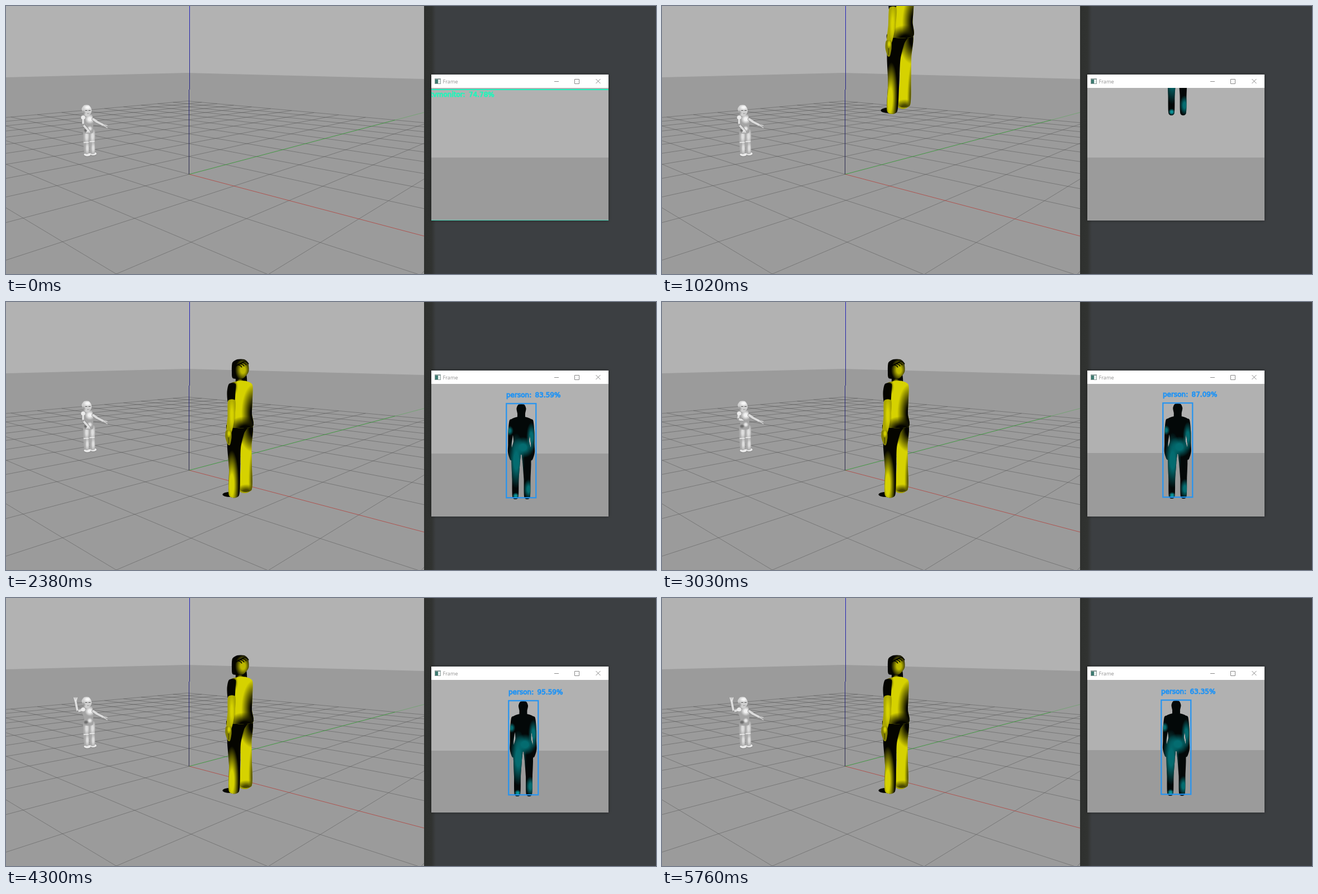
These frames come from a looping animation (1163 by 481 pixels, 6.53 s). An HTML page with a canvas:

```html
<!DOCTYPE html>
<html lang="en">
<head>
<meta charset="utf-8">
<title>Robot greeting</title>
<style>
  html, body { margin: 0; width: 100%; height: 100%; overflow: hidden; background: #3c3f42; }
  canvas { display: block; }
</style>
</head>
<body>
<canvas id="stage" width="1163" height="481"></canvas>
<script>
const c = document.getElementById('stage').getContext('2d');
const LOOP = 6530;
const YELLOW = '#d6d200', BLACK = '#050500', TEAL = '#046c70', INK = '#030808', BLUE = '#2494f2';

// ---------- helpers ----------
function rect(x, y, w, h, color) {
  c.fillStyle = color;
  c.fillRect(x, y, w, h);
}

function line(pts, color, width = 1) {
  c.beginPath();
  for (const [x, y] of pts) c.lineTo(x, y);
  c.strokeStyle = color;
  c.lineWidth = width;
  c.stroke();
}

function oval(x, y, rx, ry, color) {
  c.beginPath();
  c.ellipse(x, y, rx, ry, 0, 0, 7);
  c.fillStyle = color;
  c.fill();
}

// smooth ramp from 0 to 1 between two times
function ramp(t, from, to) {
  const u = Math.max(0, Math.min(1, (t - from) / (to - from)));
  return u * u * (3 - 2 * u);
}

// upright body part through knots of [x, y, half width]
function tube(...knots) {
  const pts = [...knots.map(([x, y, w]) => [x - w, y]),
               ...knots.reverse().map(([x, y, w]) => [x + w, y])];
  const n = pts.length, path = new Path2D();
  path.moveTo(...pts[0]);
  pts.forEach((p, i) => {
    const [o, q, r] = [n - 1, 1, 2].map(k => pts[(i + k) % n]);
    path.bezierCurveTo(p[0] + (q[0] - o[0]) / 8, p[1] + (q[1] - o[1]) / 8,
                       q[0] - (r[0] - p[0]) / 8, q[1] - (r[1] - p[1]) / 8, ...q);
  });
  return path;
}

// fill a path, with soft spots of [x, y, rx, ry, color] inside it
function paint(path, base, ...spots) {
  c.save();
  c.fillStyle = base;
  c.fill(path);
  c.clip(path);
  for (const [x, y, rx, ry, color] of spots) {
    c.save();
    c.translate(x, y);
    c.scale(rx, ry);
    const glow = c.createRadialGradient(0, 0, .3, 0, 0, 1);
    glow.addColorStop(0, color);
    glow.addColorStop(1, color + '00');
    rect(-1, -1, 2, 2, glow);
    c.restore();
  }
  c.restore();
}

// ---------- ground ----------
const depth = (x, y) => 1 - .0949 * x + .0936 * y;

function project(x, y) {
  const w = depth(x, y);
  return [(328 + 41.2 * x + 102 * y) / w, 100.7 + 201.3 / w];
}

function floorLine(place, from, to, color) {
  const pts = [];
  for (let s = from; s <= to; s += .5) {
    const spot = place(s);
    if (depth(...spot) > .35) pts.push(project(...spot));
  }
  line(pts, color);
}

function world() {
  rect(0, 0, 748, 481, '#b2b2b2');
  c.beginPath();
  for (const [x, y] of [[0, 128], [323, 120], [748, 131], [748, 481], [0, 481]]) c.lineTo(x, y);
  c.fillStyle = '#9b9b9b';
  c.fill();
  const grid = 'rgba(70,70,70,.42)';
  for (let k = -10; k <= 10; k++) {
    floorLine(s => [s, k], -10, k ? 10 : 0, grid);
    floorLine(s => [k, s], -10, k ? 10 : 0, grid);
  }
  floorLine(s => [s, 0], 0, 10, 'rgba(180,60,55,.75)');
  floorLine(s => [0, s], 0, 10, 'rgba(45,150,45,.8)');
  floorLine(s => [0, s], 10, 14, 'rgba(80,170,80,.5)');
  const blue = c.createLinearGradient(0, 0, 0, 302);
  blue.addColorStop(0, '#2020c0');
  blue.addColorStop(1, '#2c2c48');
  rect(328, 0, 1, 150, blue);
  rect(327, 150, 1, 152, blue);
}

// ---------- robot ----------
function limb(pts, width) {
  line(pts, '#777', width + 1);
  line(pts, '#dcdcdc', width);
}

function robot(t) {
  c.lineCap = c.lineJoin = 'round';
  for (const [x, y] of [[154, -1.5], [143.5, 0]]) {
    oval(x + 2, 267.5 + y, 6.5, 3.5, '#8f8f8f');
    oval(x + 2, 266.5 + y, 6, 3, '#ededed');
    paint(tube([x, 223, 5], [x, 244, 5], [x + 1, 264, 4]), '#a9a9a9',
      [x + 1, 234, 5, 14, '#dedede'], [x + 2, 255, 4, 12, '#dedede']);
    line([[x - 4, 245 + y], [x + 4, 244.5 + y]], '#f0f0f0', 1.5);
  }
  paint(tube([146, 195, 7], [146, 205, 10], [148, 216, 8], [147, 228, 8]), '#a4a4a4',
    [150, 203, 9, 9, '#f2f2f2'], [150, 220, 5, 5, '#e8e8e8'], [143, 223, 5, 4, '#6c6c6c']);

  limb([[156, 203], [163, 208], [173, 213]], 4);
  for (const dy of [0, 4]) line([[173, 213], [181, 214.5 + dy]], '#d8d8d8', 1.4);

  // the waving arm swings outwards while the hand lifts
  const out = ramp(t, 2500, 4300), up = ramp(t, 2700, 3600);
  const wave = t > 4480 && t < 5510 ? 1 - Math.cos((t - 4480) / 1030 * Math.PI * 4) : 0;
  const elbow = [138 - 10 * out, 213 - 9.5 * up];
  const [hx, hy] = [147 - 22.5 * out + wave, 223 - 38 * up];
  limb([[138, 200], elbow, [hx, hy]], 4);
  oval(...elbow, 1.8, 1.8, '#929292');
  oval(138, 200, 3.8, 3.5, '#ececec');
  for (const f of [-1, 0, 1]) line([[hx + f, hy], [hx + f * 2.6, hy + 4 - 10 * up]], '#e6e6e6', 1.6);

  paint(tube([144, 178, 4], [144, 184, 8.5], [145, 190, 8], [145, 197, 3]), '#cfcfcf',
    [146, 182, 8, 5, '#f6f6f6'], [138, 192, 5, 6, '#999999']);
  for (const x of [142, 148]) line([[x, 187.5], [x + 3, 187.5]], '#555', 1.1);
  line([[145, 193], [149, 193]], '#888', .8);
  c.lineCap = 'butt';
}

// ---------- falling figure ----------
const fall = (t, speed) => Math.min(0, -158 + speed * (t - 1020) + .00005 * (t - 1020) ** 2);

function figure(t) {
  const dy = fall(t, .257);
  c.save();
  c.translate(-dy * .024, 350 + dy);
  c.transform(1, 0, dy * .0002, 1 - dy * .00057, 0, 0);
  c.translate(0, -350);
  oval(427, 339, 9, 4, '#a5a200');
  oval(401, 345.5, 13.5, 4.5, BLACK);
  // legs
  paint(tube([428, 222, 13], [429, 258, 10.5], [430, 295, 10], [429, 337, 10.5]), YELLOW,
    [444, 228, 28, 42, BLACK], [416, 226, 13, 34, BLACK], [443, 320, 9, 60, '#4a4800'], [430, 341, 20, 14, '#4a4800']);
  paint(tube([415, 219, 19], [411, 236, 15], [408, 262, 12], [409, 300, 10], [408, 347, 9]), BLACK,
    [404, 328, 13, 62, YELLOW]);
  // neck and shirt
  paint(tube([421, 128, 8], [421, 148, 9]), BLACK, [419, 143, 6, 6, '#969300']);
  paint(tube([422, 142, 8], [420, 149, 21], [422, 175, 19], [422, 200, 18], [420, 224, 21]), YELLOW,
    [445, 200, 24, 54, BLACK], [428, 229, 34, 24, BLACK], [402, 210, 9, 40, '#5b5900'], [401, 152, 14, 20, BLACK]);
  // arm
  paint(tube([405, 147, 6], [403, 162, 7.5], [403, 181, 5.5]), BLACK);
  paint(tube([404, 177, 6.5], [403, 205, 6.5], [399, 234, 4.5]), '#aaa600', [404, 203, 6, 32, YELLOW]);
  paint(tube([398, 231, 4.5], [398, 243, 5.5], [399, 256, 2]), '#858200', [399, 236, 4, 8, YELLOW]);
  line([[398, 243], [398.5, 254]], '#3a3900');
  // head with strands of hair
  paint(tube([420, 103, 6], [419, 109, 14], [419, 125, 15], [415, 137, 9]), BLACK,
    [424, 122, 14, 20, '#bdb900']);
  for (let k = 0; k < 4; k++) {
    c.beginPath();
    c.arc(415 + k * 4, 121 - k * 2, 8, 3.6, 5.8);
    c.strokeStyle = BLACK;
    c.lineWidth = 1.5;
    c.stroke();
  }
  c.restore();
}

// ---------- camera window ----------
const SWAY = [ // time, view shift x and y, score
  [1800, 0, 0, 70.24],
  [2340, 0, 0, 83.59],
  [3600, 1.5, -2, 90.58],
  [4230, 3.5, 2, 95.59],
  [5760, -2, 1, 63.35]
];

// values of the view, refreshed every 90 ms
function sway(t) {
  const now = Math.max(1800, Math.min(5760, Math.floor(t / 90) * 90));
  const i = Math.max(1, SWAY.findIndex(k => k[0] >= now));
  const [a, b] = [SWAY[i - 1], SWAY[i]];
  const f = (now - a[0]) / (b[0] - a[0]);
  return a.map((v, j) => v + (b[j] - v) * f).slice(1);
}

function label(text, x, y, color) {
  c.font = '12px "DejaVu Sans", sans-serif';
  c.wordSpacing = '2.6px';
  c.fillStyle = c.strokeStyle = color;
  c.lineWidth = 1;
  c.fillText(text, x, y);
  c.strokeText(text, x, y);
  c.wordSpacing = '0px';
}

function seenFigure(x, y) {
  const body = tube([0, 184, 5], [0, 191, 8.5], [0, 200, 7], [0, 208, 6]);
  body.addPath(tube([0, 206, 6], [0, 212, 19], [0, 232, 16], [0, 250, 14], [0, 272, 17]));
  for (const side of [-1, 1]) {
    body.addPath(tube([side * 17, 212, 4], [side * 19, 234, 4.5], [side * 20.5, 256, 3.2],
                      [side * 20, 270, 4], [side * 18, 283, 2]));
    body.addPath(tube([side * 9, 262, 8], [side * 10, 290, 7.5], [side * 10.5, 318, 6], [side * 10.5, 351, 5]));
  }
  c.save();
  c.translate(922 + x, y);
  c.filter = 'blur(0.5px)';
  paint(body, INK, [-9, 285, 15, 50, TEAL], [3, 261, 21, 19, TEAL], [18, 242, 9, 26, TEAL],
    [-21, 231, 7, 9, TEAL], [13, 336, 9, 18, TEAL], [-10, 348, 6, 6, '#0b9398']);
  c.restore();
}

function titleBar() {
  rect(761, 123, 317, 24, '#fff');
  rect(767, 130, 11, 10, '#8c9c9a');
  rect(768, 132, 9, 7, '#e8efee');
  rect(768, 132, 5, 7, '#3d7a70');
  c.font = '9.2px "Open Sans", "Noto Sans", sans-serif';
  c.fillStyle = '#8f8f8f';
  c.fillText('Frame', 781.5, 138.5);
  line([[981, 135.5], [989, 135.5]], '#888');
  c.strokeRect(1017.5, 131.5, 8, 8);
  line([[1055.5, 131], [1063.5, 139]], '#888');
  line([[1063.5, 131], [1055.5, 139]], '#888');
}

function camera(t) {
  const [dx, dy, score] = sway(t);
  c.save();
  c.shadowColor = 'rgba(0,0,0,.4)';
  c.shadowBlur = 6;
  rect(761, 123, 317, 262, '#9b9b9b');
  c.restore();
  titleBar();

  c.save();
  c.beginPath();
  c.rect(761, 147, 317, 238);
  c.clip();
  rect(761, 147, 317, 125 + dy, '#b1b1b1');
  seenFigure(dx, dy + fall(t, .126));
  if (t < 740) {
    rect(761, 149, 317, 2, '#1feebb');
    rect(761, 384, 317, 1, '#4fd3b6');
    label('tvmonitor: 74.78%', 759, 163, '#22f5ba');
  }
  if (t >= 1870) {
    const [x, y] = [Math.round(895 + dx), Math.round(182 + dy)];
    c.strokeStyle = BLUE;
    c.lineWidth = 2.2;
    c.lineJoin = 'miter';
    c.strokeRect(x + .3, y + .3, 53, 169);
    label(`person: ${score.toFixed(2)}%`, x, y - 11, BLUE);
  }
  c.restore();
}

function desk() {
  rect(748, 0, 415, 481, '#3c3f42');
  const edge = c.createLinearGradient(748, 0, 769, 0);
  edge.addColorStop(0, '#2e302e');
  edge.addColorStop(.65, '#313331');
  edge.addColorStop(1, '#3c3f42');
  rect(748, 0, 21, 481, edge);
}

function draw(now) {
  const t = now % LOOP;
  world();
  robot(t);
  figure(t);
  desk();
  camera(t);
  requestAnimationFrame(draw);
}
requestAnimationFrame(draw);
</script>
</body>
</html>
```
